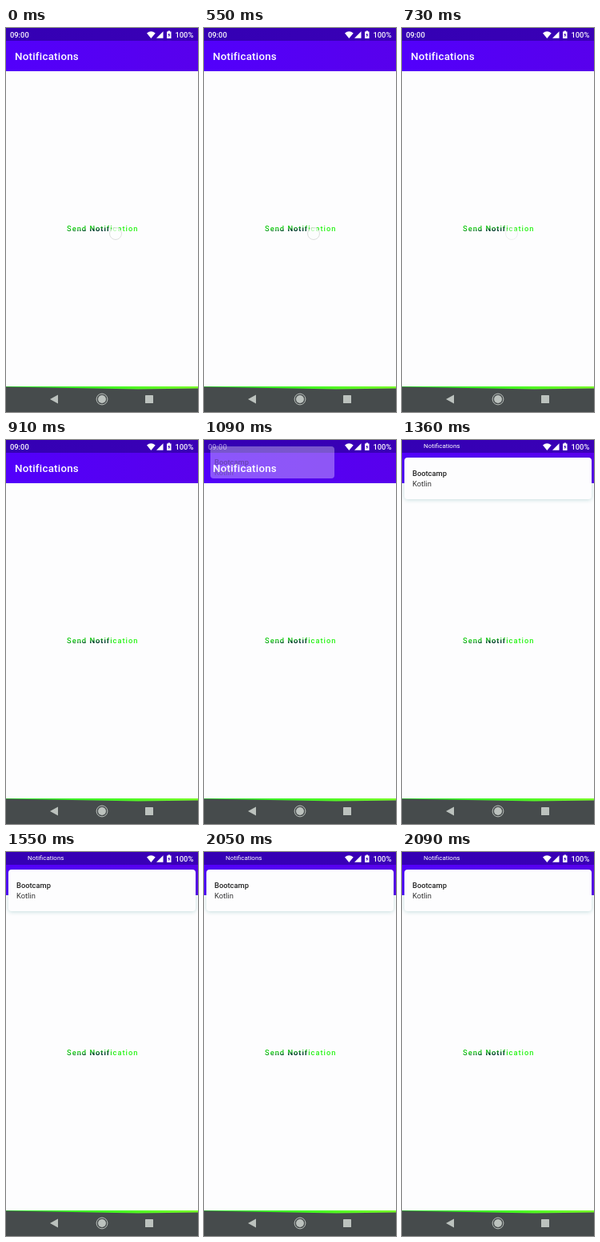
Animation of 240 by 480 pixels, one loop 2870 ms. Source, as an HTML page:

```html
<!DOCTYPE html>
<html lang="en">
<head>
<meta charset="utf-8">
<title>Notifications</title>
<style>
  :root { --loop: 2870ms linear infinite both; }
  html, body { margin: 0; width: 100%; height: 100%; overflow: hidden; }
  body {
    position: relative;
    background: #fdfdfe;
    font: 500 9.33px/12px Roboto, sans-serif;
    color: #fff;
  }
  body > *, .message > * { position: absolute; white-space: nowrap; }

  .appbar {
    left: 0; top: 16px; width: 240px; height: 38px;
    background: linear-gradient(90deg, #5200fb, #5800ec);
  }
  .title {
    left: 11px; top: 28px;
    font-size: 13.33px; line-height: 16px; letter-spacing: .23px;
  }
  .send {
    left: 76px; top: 245px; letter-spacing: 1px;
    color: transparent;
    background:
      linear-gradient(174deg, transparent 42%, #06203c 66%) 0 0 / 54px 100% no-repeat,
      linear-gradient(90deg, #16cc14, #14c414 45%, #26f414 70%);
    -webkit-background-clip: text;
    background-clip: text;
  }
  .touch {
    left: 129px; top: 249px; width: 14px; height: 14px;
    border: 1px solid #dcdfdc; border-radius: 50%;
    background: rgba(252, 253, 254, .68);
    animation: lift var(--loop);
  }

  .status {
    left: 0; top: 0; width: 240px; height: 16px;
    background: linear-gradient(90deg, #3400b4, #3a00b6);
  }
  .clock { left: 5px; top: 3px; animation: clock var(--loop); }
  .app { left: 27px; top: 2px; font-size: 8px; font-weight: 400; animation: app var(--loop); }
  .charge { left: 211.5px; top: 3px; }

  .card {
    border-radius: 4px;
    background: #fdfdfe;
    box-shadow: 0 1px 5px rgba(40, 130, 130, .25);
    animation: card var(--loop);
  }
  .message { left: 13px; top: 0; color: #222; animation: message var(--loop); }
  .message b { top: 14px; font-weight: 500; }
  .message span { top: 27px; font-weight: 400; color: #333; }

  svg { left: 0; top: 0; }

  @keyframes lift {
    0%, 19.16% { opacity: 1; }
    31%, 100% { opacity: 0; }
  }
  @keyframes clock {
    0%, 36.5% { opacity: 1; }
    39.5%, 100% { opacity: 0; }
  }
  @keyframes app {
    0%, 38% { opacity: 0; }
    41.1% { opacity: .62; }
    46%, 100% { opacity: 1; }
  }
  @keyframes card {
    0%, 36.4% { left: 9px; top: 3px; width: 140px; height: 36px; opacity: 0; }
    41.1% {
      left: 5px; top: 18px; width: 185px; height: 46px; opacity: 1;
      animation-timing-function: ease-out;
    }
    47.3% { left: 3px; top: 22px; width: 234px; height: 52px; opacity: 1; }
    54%, 100% { left: 3px; top: 21.5px; width: 234px; height: 52.5px; opacity: 1; }
  }
  @keyframes message {
    0%, 36.4% { transform: translateY(3px); opacity: 0; }
    41.1% {
      transform: translateY(18px); opacity: .95;
      animation-timing-function: ease-out;
    }
    47.3% { transform: translateY(22px); opacity: 1; }
    54%, 100% { transform: translateY(21.5px); opacity: 1; }
  }
</style>
</head>
<body>
  <div class="appbar"></div>
  <div class="title">Notifications</div>
  <div class="send">Send Notification</div>
  <div class="touch"></div>

  <div class="status"></div>
  <div class="card"></div>
  <div class="message"><b>Bootcamp</b><span>Kotlin</span></div>
  <div class="clock">09:00</div>
  <div class="app">Notifications</div>
  <div class="charge">100%</div>

  <svg width="240" height="480" viewBox="0 0 240 480">
    <defs>
      <linearGradient id="edge">
        <stop stop-color="#2ce82c"/>
        <stop offset=".6" stop-color="#48f722"/>
        <stop offset="1" stop-color="#78fa28"/>
      </linearGradient>
    </defs>

    <!-- status icons -->
    <g fill="#fff">
      <path d="M176 6.5Q181.3 2.1 186.7 6.5L181.3 13Z"/>
      <path d="M196.5 4.3V12.7H188Z"/>
      <path d="M202.5 4.5V3.6H205V4.5H206.5V13H201V4.5Z"/>
    </g>
    <path d="M204.2 5.9L202.3 9.1H203.5V11.7L205.3 8.3H204.2Z" fill="#3a00b5"/>

    <!-- navigation bar -->
    <path d="M0 448H240V480H0Z" fill="#464b4c"/>
    <path d="M0 448H240V450.6L165 451.6L0 448.6Z" fill="url(#edge)"/>
    <g fill="#bcc2be">
      <path d="M55 464L65 458.5V469.5Z"/>
      <circle cx="120" cy="464" r="5"/>
      <rect x="174" y="459" width="10" height="10" rx=".6"/>
    </g>
    <circle cx="120" cy="464" r="6.9" fill="none" stroke="#bcc2be"/>
  </svg>
</body>
</html>
```
